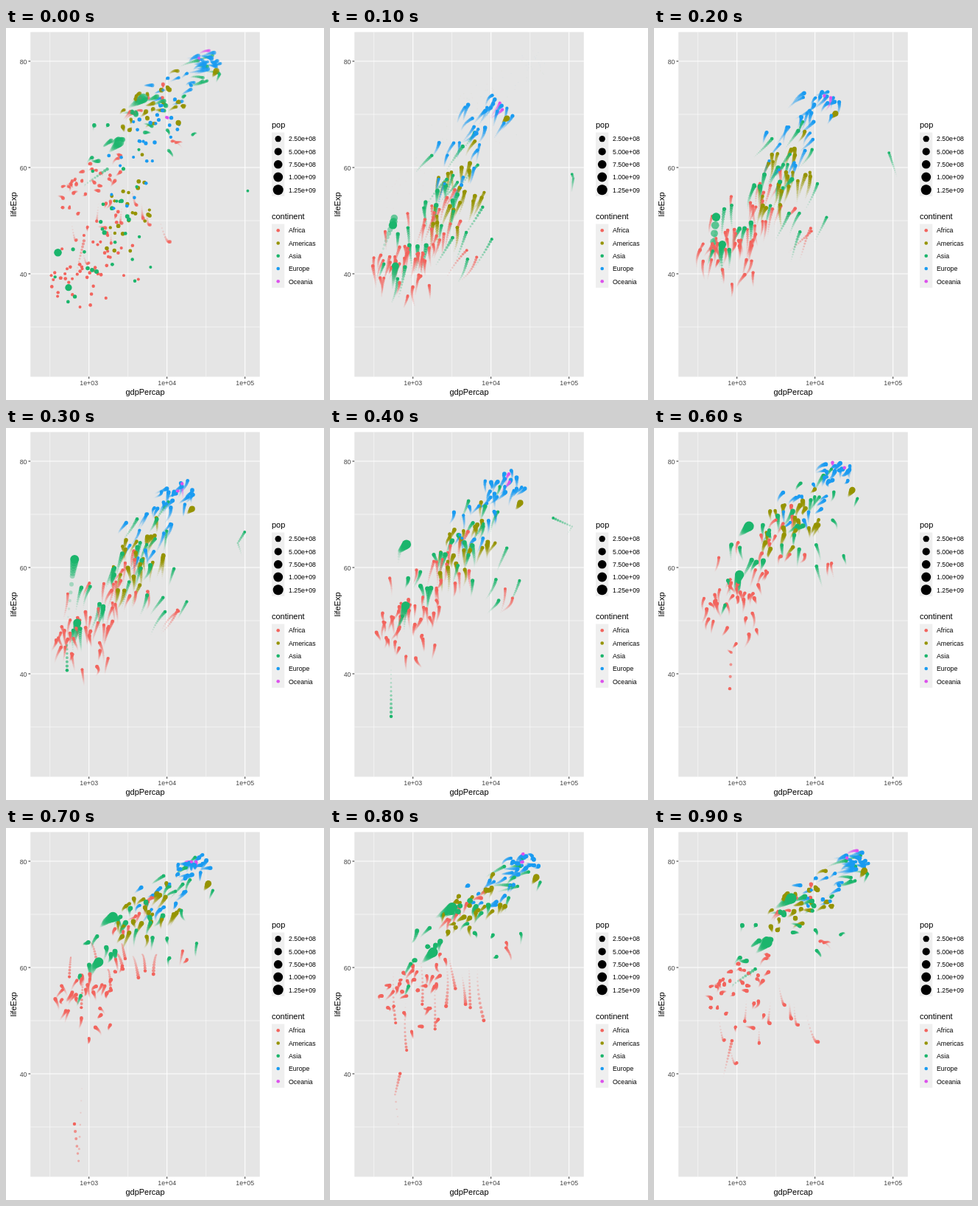
Recreate the animation shown at these times as an HTML page with a canvas. Size 432 by 504 pixels, loop 1 s.

```html
<!DOCTYPE html>
<html lang="en">
<head>
<meta charset="utf-8">
<title>lifeExp by gdpPercap</title>
<style>
  html, body { margin: 0; width: 100%; height: 100%; overflow: hidden; background: #fff; }
  svg, canvas { position: absolute; left: 0; top: 0; width: 432px; height: 504px; }
  text { font: 8.8px "Liberation Sans", Arial, sans-serif; fill: #000; }
  .axis { fill: #444; }
  .title { font-size: 11px; }
</style>
</head>
<body>
<svg id="chart" viewBox="0 0 432 504"></svg>
<canvas id="dots" width="432" height="504"></canvas>
<script>
const COLORS = { Africa: '#f2645d', Americas: '#959300', Asia: '#1bb56c', Europe: '#1a9bf1', Oceania: '#dc52ec' };
const STEPS = 100, STRIDE = 11, WAKE = 12, MAX_POP = 1318.7;
const px = gdp => 112.7 + 106 * (Math.log10(gdp) - 3);
const py = life => 45 + 7.2 * (80 - life);
const mix = (a, b, t) => a + (b - a) * t;
const geo = (a, b, t) => a * (b / a) ** t;
const sizeOf = pop => 1 + 5 * Math.sqrt(pop / MAX_POP);
const radius = size => 0.75 + 1.067 * size;

// ---- static chart ----
function drawChart() {
  let out = '';
  const rect = (x, y, w, h, fill) => out += `<rect x="${x}" y="${y}" width="${w}" height="${h}" fill="${fill}"/>`;
  const line = (x1, y1, x2, y2, color, w) =>
    out += `<path d="M${x1} ${y1}L${x2} ${y2}" stroke="${color}" stroke-width="${w}"/>`;
  const dot = (x, y, r, fill) => out += `<circle cx="${x}" cy="${y}" r="${r}" fill="${fill}"/>`;
  const text = (x, y, s, cls = '', anchor = 'start', extra = '') =>
    out += `<text x="${x}" y="${y}" class="${cls}" text-anchor="${anchor}" ${extra}>${s}</text>`;

  rect(33.2, 5.5, 311.6, 467, '#e5e5e5');
  for (const e of [2.5, 3.5, 4.5]) line(px(10 ** e), 5.5, px(10 ** e), 472.5, '#fff', 0.55);
  for (const v of [30, 50, 70]) line(33.2, py(v), 344.8, py(v), '#fff', 0.55);
  for (const e of [3, 4, 5]) {
    const x = px(10 ** e);
    line(x, 5.5, x, 472.5, '#fff', 1.07);
    line(x, 472.5, x, 475.2, '#2b2b2b', 1);
    text(x, 483.6, `1e+0${e}`, 'axis', 'middle');
  }
  for (const v of [40, 60, 80]) {
    const y = py(v);
    line(33.2, y, 344.8, y, '#fff', 1.07);
    line(30.5, y, 33.2, y, '#2b2b2b', 1);
    text(28.5, y + 3.7, v, 'axis', 'end');
  }
  text(189, 497, 'gdpPercap', 'title', 'middle');
  text(0, 0, 'lifeExp', 'title', 'middle', 'transform="translate(13.5 239) rotate(-90)"');

  const keyY = (top, i) => top + 8.7 + 17.28 * i;
  text(361, 135, 'pop', 'title');
  rect(361, 141.5, 17.3, 86.4, '#efefef');
  ['2.50e+08', '5.00e+08', '7.50e+08', '1.00e+09', '1.25e+09'].forEach((s, i) => {
    dot(369.7, keyY(141.5, i), radius(sizeOf(250 * (i + 1))), '#000');
    text(384, keyY(141.5, i) + 3.2, s);
  });
  text(361, 259, 'continent', 'title');
  rect(361, 265.5, 17.3, 86.4, '#efefef');
  Object.entries(COLORS).forEach(([name, color], i) => {
    dot(369.7, keyY(265.5, i), 2.3, color);
    text(384, keyY(265.5, i) + 3.2, name);
  });
  chart.innerHTML = out;
}

// ---- countries: each has a place at(t), t running from 0 (1952) to 1 (2007) ----
const countries = [];
let seed = 1952;
const rand = () => (seed = (seed * 16807) % 2147483647) / 2147483647;
const add = (continent, pop0, pop1, at) => countries.push({ color: COLORS[continent], pop0, pop1, at });

const easeOut = t => 1 - (1 - t) ** 1.7;
const growth = t => t + 0.07 * Math.sin(2 * Math.PI * t);
const smooth = t => { t = Math.min(1, Math.max(0, t)); return t * t * (3 - 2 * t); };

// A slow wave that makes each country wander off its trend
function wave(size) {
  const phase = rand() * 7, speed = mix(9, 19, rand()), reach = size * mix(0.4, 1, rand());
  return t => reach * Math.sin(phase + speed * t);
}

// n similar countries; from and to: [lowest, highest income, lowest, highest life expectancy].
// boom lifts income midway (in powers of ten), crisis takes years of life away in the 1990s.
function cohort(continent, n, pop, link, from, to, { boom = 0, crisis = 0 } = {}) {
  for (let i = 0; i < n; i++) {
    const rich = (i + rand()) / n, fit = mix(rand(), rich, link), p = pop * (0.1 + rand() ** 2);
    const range = ([g0, g1, l0, l1]) => [geo(g0, g1, rich), mix(l0, l1, fit)];
    const [gdp0, life0] = range(from), [gdp1, life1] = range(to);
    const gdpWave = wave(0.055), lifeWave = wave(0.8), loss = crisis * mix(0.7, 1.2, rand());
    add(continent, p, p * 2, t => ({
      x: px(geo(gdp0, gdp1, growth(t)) * 10 ** (boom * Math.sin(Math.PI * t) + gdpWave(t))),
      y: py(mix(life0, life1, easeOut(t)) - loss * smooth((t - 0.65) / 0.33) + lifeWave(t)),
    }));
  }
}

// One country through key points [year, income, life expectancy]
function trace(continent, pop0, pop1, ...keys) {
  add(continent, pop0, pop1, t => {
    const year = 1952 + 55 * t;
    const i = Math.max(1, keys.findIndex(k => k[0] >= year - 1e-6));
    const a = keys[i - 1], b = keys[i], f = (year - a[0]) / (b[0] - a[0]);
    return { x: mix(px(a[1]), px(b[1]), f), y: py(mix(a[2], b[2], f)) };
  });
}

cohort('Africa', 33, 14, 0.3, [310, 2000, 31, 44], [430, 2700, 45, 63]);
cohort('Africa', 9, 12, 0.2, [400, 4700, 38, 49], [600, 12500, 61, 69], { crisis: 18 });
cohort('Africa', 7, 20, 0.5, [1000, 2700, 41, 52], [2700, 10900, 66, 76]);
cohort('Africa', 2, 3, 0.5, [2400, 4300, 36, 43], [12000, 13200, 56, 74], { boom: 0.4 });
cohort('Americas', 23, 50, 0.5, [1700, 6500, 38, 66], [2600, 18500, 64, 80]);
cohort('Asia', 16, 80, 0.5, [500, 3600, 30, 57], [950, 11500, 58, 76]);
cohort('Asia', 5, 20, 0.3, [1900, 8000, 36, 51], [4500, 30000, 60, 77], { boom: 0.3 });
cohort('Asia', 7, 30, 0.4, [1100, 5500, 50, 66], [22000, 46000, 75, 83]);
cohort('Europe', 12, 20, 0.3, [1700, 6800, 50, 67], [6500, 25500, 71, 78]);
cohort('Europe', 18, 40, 0.3, [3500, 14500, 63, 73], [25000, 48000, 78, 82]);
cohort('Oceania', 2, 8, 0.5, [9900, 10700, 69, 69.5], [24000, 36000, 80, 81.5]);

trace('Africa', 2.5, 8.9, [1952, 493, 40], [1977, 670, 45], [1987, 848, 44], [1992, 737, 23.6],
  [1997, 590, 36.1], [2007, 863, 46.2]); // Rwanda
trace('Americas', 158, 301, [1952, 13990, 68.4], [1972, 21806, 71.3], [2007, 42952, 78.2]); // United States
trace('Asia', 0.2, 2.5, [1952, 108382, 55.6], [1957, 113523, 58], [1967, 80895, 64.6], [1972, 109348, 67.7],
  [1982, 31354, 71.3], [2007, 47307, 77.6]); // Kuwait
trace('Asia', 5, 14, [1952, 368, 39.4], [1967, 523, 45.4], [1977, 525, 31.2], [1982, 624, 51],
  [2002, 896, 56.8], [2007, 1714, 59.7]); // Cambodia
trace('Asia', 372, 1110, [1952, 547, 37.4], [1972, 724, 50.7], [1992, 1164, 60.2], [2007, 2452, 64.7]); // India
trace('Asia', 556, 1319, [1952, 400, 44], [1957, 576, 50.5], [1962, 488, 44.5], [1967, 613, 58.4],
  [1972, 677, 63.1], [1992, 1656, 68.7], [2007, 4959, 73]); // China

// ---- animation ----
const ctx = dots.getContext('2d');

function draw(frame) {
  ctx.clearRect(0, 0, 432, 504);
  for (let back = WAKE; back >= 0; back--) {
    const t = (frame * STRIDE - back + STEPS) % STEPS / (STEPS - 1);
    const fade = 1 - back / (WAKE + 0.5);
    ctx.globalAlpha = back ? 0.75 * fade : 1;
    for (const { color, pop0, pop1, at } of countries) {
      const { x, y } = at(t);
      ctx.fillStyle = color;
      ctx.beginPath();
      ctx.arc(x, y, radius(sizeOf(mix(pop0, pop1, t)) * fade), 0, 2 * Math.PI);
      ctx.fill();
    }
  }
}

let shown = -1;
function tick() {
  const frame = Math.floor(performance.now() / 100) % 10;
  if (frame !== shown) draw(shown = frame);
  requestAnimationFrame(tick);
}

drawChart();
tick();
</script>
</body>
</html>
```
